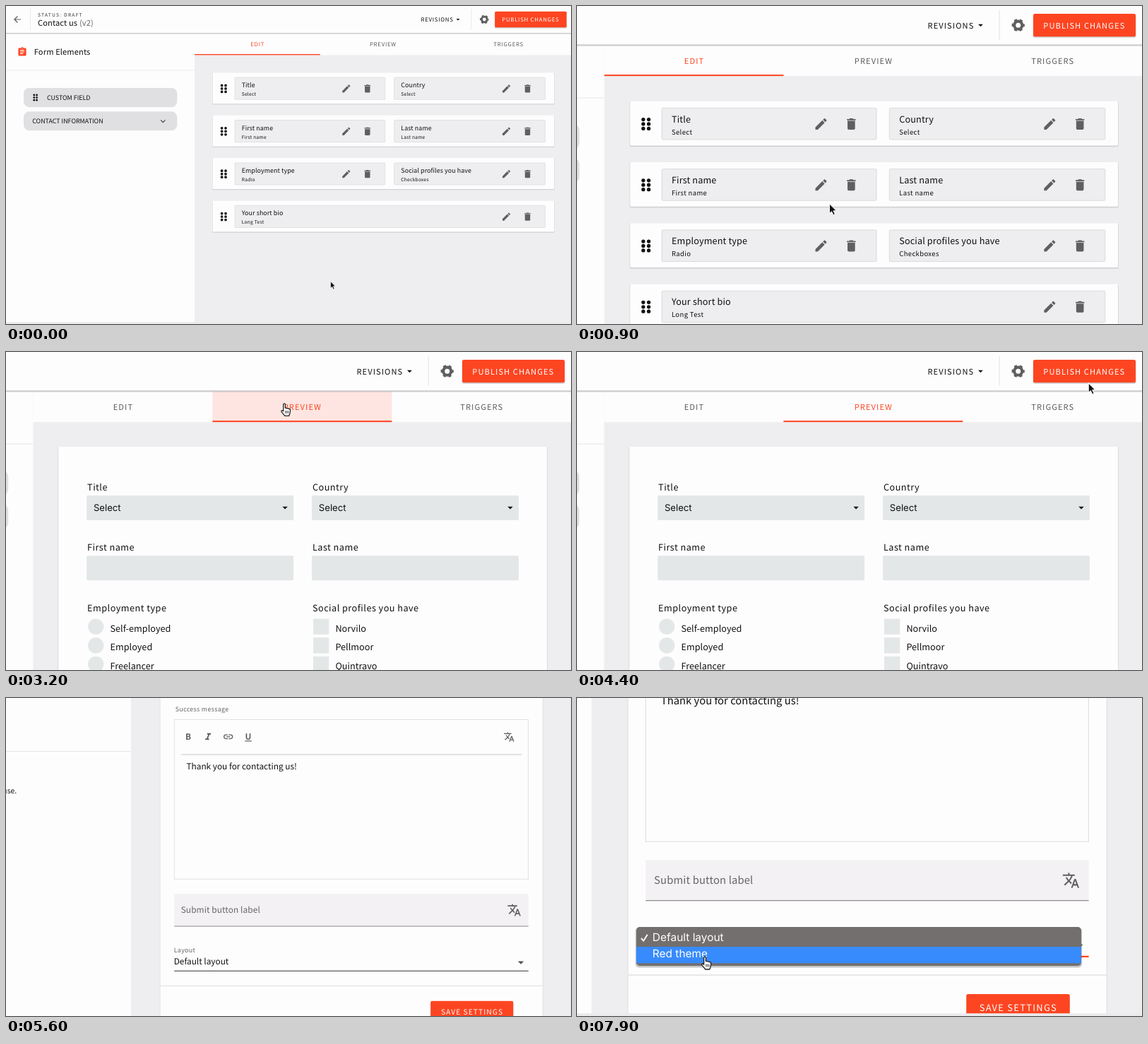
An HTML page for the animation above (8000 ms loop, 800x450 px).

```html
<!DOCTYPE html>
<html lang="en">
<head>
<meta charset="utf-8">
<title>Form builder</title>
<style>
html, body { margin: 0; width: 100%; height: 100%; overflow: hidden; background: #eeedef; }
svg { display: block; width: 100vw; height: 100vh; }
text {
  font-family: "Noto Sans CJK JP", "Noto Sans CJK SC", "Noto Sans CJK", "Noto Sans", sans-serif;
  font-size: 8.88px; fill: #111; text-rendering: geometricPrecision; white-space: pre;
}
.name { letter-spacing: .09px; }
.small { font-size: 6.66px; letter-spacing: .25px; }
.over { font-size: 6.66px; letter-spacing: 1.24px; fill: #333; }
.head { font-size: 11.1px; letter-spacing: .12px; }
.btn { font-size: 7.77px; letter-spacing: .775px; }
.label { letter-spacing: .33px; }
.sys { font-family: Inter, "Liberation Sans", sans-serif; font-size: 9.2px; }
.note { font-size: 8.85px; letter-spacing: .33px; fill: #666; }
.field { font-size: 11.8px; letter-spacing: .1px; }
.menu { font-family: Inter, "Liberation Sans", sans-serif; font-size: 12.3px; fill: #fff; }
</style>
</head>
<body>
<svg id="stage" viewBox="0 0 800 450"></svg>
<script>
const WHITE = '#fefdfe', GREY = '#eeedef', ORANGE = '#fd4521', ICON = '#5f5f5f', SOFT = '#e4e7e8';

const ICONS = {
  back: 'M20 11H7.83l5.59-5.59L12 4l-8 8 8 8 1.41-1.41L7.83 13H20z',
  list: 'M19 3h-4.18C14.4 1.84 13.3 1 12 1s-2.4.84-2.82 2H5a2 2 0 0 0-2 2v14a2 2 0 0 0 2 2h14a2 2 0 0 0 2-2V5a2 2 0 0 0-2-2zm-7 0a1 1 0 1 1 0 2 1 1 0 0 1 0-2zm2 14H7v-2h7zm3-4H7v-2h10zm0-4H7V7h10z',
  pencil: 'M3 17.25V21h3.75L17.81 9.94l-3.75-3.75zM20.71 7.04a1 1 0 0 0 0-1.41l-2.34-2.34a1 1 0 0 0-1.41 0l-1.83 1.83 3.75 3.75z',
  trash: 'M6 19a2 2 0 0 0 2 2h8a2 2 0 0 0 2-2V7H6zM19 4h-3.5l-1-1h-5l-1 1H5v2h14z',
  down: 'M7.4 8.6 12 13.2l4.6-4.6L18 10l-6 6-6-6z',
  caret: 'M7 10l5 5 5-5z',
  italic: 'M10 4v3h2.2l-3.4 8H6v3h8v-3h-2.2l3.4-8H18V4z',
  link: 'M3.9 12A3.1 3.1 0 0 1 7 8.9h4V7H7a5 5 0 0 0 0 10h4v-1.9H7A3.1 3.1 0 0 1 3.9 12zM8 13h8v-2H8zm9-6h-4v1.9h4a3.1 3.1 0 0 1 0 6.2h-4V17h4a5 5 0 0 0 0-10z',
  translate: 'M12.9 15.1l-2.6-2.5C12.1 10.6 13.3 8.4 14.1 6H17V4h-7V2H8v2H1v2h11.2C11.5 7.9 10.4 9.8 9 11.4 8.1 10.3 7.3 9.2 6.7 8h-2c.7 1.6 1.7 3.2 3 4.6l-5.1 5L4 19l5-5 3.1 3.1zM18.5 10h-2L12 22h2l1.1-3h4.8l1.1 3h2zm-2.6 7l1.6-4.3 1.6 4.3z'
};

const rect = (x, y, x2, y2, fill, extra = '') =>
  `<rect x="${x}" y="${y}" width="${x2 - x}" height="${y2 - y}" fill="${fill}" ${extra}/>`;
const text = (x, y, str, cls = '', extra = '') => `<text x="${x}" y="${y}" class="${cls}" ${extra}>${str}</text>`;
const line = (x, y, x2, y2, color, width = 1) =>
  `<path d="M${x} ${y}L${x2} ${y2}" stroke="${color}" stroke-width="${width}"/>`;
const icon = (name, x, y, fill = ICON, k = .62) =>
  `<path d="${ICONS[name]}" transform="translate(${x} ${y}) scale(${k}) translate(-12 -12)" fill="${fill}"/>`;
const dots = (x, y, dx, dy, r) => [-1, 0, 1].map(j => [-1, 1].map(i =>
  `<circle cx="${x + i * dx}" cy="${y + j * dy}" r="${r}" fill="#111"/>`).join('')).join('');
const card = (x, y, x2, y2) =>
  rect(x - .5, y, x2 + .5, y2 + 1.2, '#d3d2d4', 'rx="1"') + rect(x, y - .2, x2, y2, WHITE, 'rx=".8"');
const middle = 'text-anchor="middle"';

function header() {
  return rect(0, 38, 800, 40, '#000', 'opacity=".1"') + rect(0, -2, 800, 38.3, WHITE) + line(0, 38.6, 800, 38.6, '#c4c3c5', .8) +
    icon('back', 16, 19) + line(34.5, 4, 34.5, 34, '#e2e1e3', .7) +
    text(45, 14.6, 'STATUS: DRAFT', 'over') + text(45, 28, 'Contact us', 'head') +
    text(104, 28, '(v2)', 'head', 'style="fill:#666"') +
    text(587.5, 22.1, 'REVISIONS', 'btn') + icon('caret', 640, 19, '#111', .48) +
    line(658.7, 4, 658.7, 33.5, '#e2e1e3', .7) +
    '<circle id="gearHover" cx="677.3" cy="19.3" r="14.3" fill="#d0cfd1"/>' +
    `<g fill="none" stroke="${ICON}"><circle cx="677.3" cy="19" r="3.9" stroke-width="2.9"/>` +
    '<circle cx="677.3" cy="19" r="5.5" stroke-width="1.8" stroke-dasharray="2.9 2.86" stroke-dashoffset="1.45"/></g>' +
    rect(692, 8.6, 794, 31.4, '#000', 'rx="1.5" opacity=".2"') + rect(692.2, 7.7, 793.7, 30.3, ORANGE, 'rx="1.5"') +
    text(702.2, 22.1, 'PUBLISH CHANGES', 'btn', 'style="fill:#fff"');
}

function sidebar() {
  return rect(0, 38, 267, 450, WHITE) + icon('list', 23, 65, ORANGE) +
    text(39.8, 69.4, 'Form Elements', 'head') + line(0, 91, 267, 91, '#e6e5e7', .8) +
    rect(25, 116, 242.3, 143.2, '#e0dfe1', 'rx="8"') + dots(41.7, 129.6, 1.9, 3.6, 1.4) + text(58, 133, 'CUSTOM FIELD') +
    rect(25, 149.3, 242.3, 176.3, '#e0dfe1', 'rx="8"') + text(37.2, 166, 'CONTACT INFORMATION') + icon('down', 222.3, 163, '#444', .6);
}

function tabs() {
  return rect(267, 38, 800, 69.4, WHITE) + rect(444.7, 39, 622.5, 69.4, ORANGE, 'id="tabFill"') +
    ['EDIT', 'PREVIEW', 'TRIGGERS'].map((name, i) =>
      text(356.2 + 177.7 * i, 57.4, name, 'btn', `${middle} id="tab${i}"`)).join('') +
    rect(267, 68, 444.7, 69.4, ORANGE, 'id="underline"');
}

function tile(x, x2, y, name, kind) {
  return rect(x, y, x2, y + 31.2, GREY, 'rx="1" stroke="#d6d5d7" stroke-width=".6"') +
    text(x + 9.7, y + 14.1, name, 'name') + text(x + 9.7, y + 26, kind, 'small') +
    icon('pencil', x2 - 55, y + 15.8) + icon('trash', x2 - 25, y + 15.8);
}

function editor() {
  const rows = [
    ['Title', 'Select', 'Country', 'Select'],
    ['First name', 'First name', 'Last name', 'Last name'],
    ['Employment type', 'Radio', 'Social profiles you have', 'Checkboxes'],
    ['Your short bio', 'Long Test']
  ];
  return rows.map(([a, b, c, d], i) => {
    const y = 94.5 + 60.4 * i;
    return card(292.6, y, 776.2, y + 43.8) + dots(308.3, y + 22.4, 2.7, 4.5, 1.85) +
      tile(324, c ? 536.8 : 763.5, y + 6.6, a, b) + (c ? tile(549.6, 763.5, y + 6.6, c, d) : '');
  }).join('');
}

function preview() {
  const cols = [
    [320, 'Title', 'First name', 'Employment type', ['Self-employed', 'Employed', 'Freelancer']],
    [543.2, 'Country', 'Last name', 'Social profiles you have', ['Norvilo', 'Pellmoor', 'Quintravo']]
  ];
  return card(292, 94, 776.2, 452) + cols.map(([x, a, b, c, options], n) =>
    [a, b, c].map((label, i) => text(x + .6, 137.1 + 59.9 * i, label, 'label')).join('') +
    [142, 201.7].map(y => rect(x, y, x + 205, y + 24.5, SOFT, 'rx=".8"')).join('') +
    text(x + 6.8, 157.6, 'Select', 'sys') + icon('caret', x + 196.6, 154.2, '#111', .52) +
    options.map((label, i) => {
      const y = 272 + 18.65 * i;
      return rect(x + 1.3, y - 7.8, x + 16.9, y + 7.8, SOFT, n ? 'rx=".6"' : 'rx="7.8"') + text(x + 23.3, y + 5, label);
    }).join('')).join('') +
    text(320.6, 349, 'Your short bio', 'label') + rect(320, 354, 748.2, 425, SOFT, 'rx=".8"');
}

// Laid out at its resting zoom of 1.165, then scaled back to page size.
function settings() {
  return '<g transform="translate(800 450) scale(.8584) translate(-800 -450)">' +
    rect(-200, -40, 800, 450, GREY) + rect(-200, -40, 179.5, 450, WHITE) + line(-200, 73.5, 179.5, 73.5, '#e6e5e7') +
    text(18.5, 133, 'use.', 'field', 'text-anchor="end" style="font-size:10.2px"') +
    card(220.8, -40, 760, 460) + text(242, 17.6, 'Success message', 'note') +
    rect(240.7, 28.7, 739.8, 253.5, 'none', 'stroke="#dfdee0" stroke-width=".9"') +
    text(260.3, 57.4, 'B', 'field', `${middle} font-weight="700" style="fill:${ICON}"`) +
    icon('italic', 288.3, 53.3, ICON, .66) + icon('link', 316.7, 53, ICON, .66) +
    text(345, 57, 'U', 'field', `${middle} font-weight="700" style="fill:${ICON}"`) + line(340.3, 59, 349.7, 59, ICON, 1.2) +
    icon('translate', 712.7, 53.2, ICON, .66) + line(250, 78, 731, 78, '#c9c8ca') +
    text(257.7, 99, 'Thank you for contacting us!', 'field', 'style="letter-spacing:0"') +
    rect(240.5, 274.5, 740, 320, '#f3f1f3', 'rx="1"') + line(240.5, 320, 740, 320, '#8a898b') +
    text(250, 301.4, 'Submit button label', 'field', 'style="fill:#666"') + icon('translate', 720, 297.2, ICON, .84) +
    text(240, 356.6, 'Layout', 'note') + text(240, 374, 'Default layout', 'field', 'style="letter-spacing:0"') +
    icon('caret', 729.3, 371, '#555', .85) +
    '<path id="selectLine" d="M240.5 383H740"/>' + line(221, 404, 760, 404, '#dddcde') +
    rect(602, 427, 718.6, 456, '#000', 'rx="2" opacity=".2"') + rect(602, 425.3, 718.6, 454, ORANGE, 'rx="2"') +
    text(660.6, 444.4, 'SAVE SETTINGS', 'btn', `${middle} style="font-size:10.27px;letter-spacing:1.02px;fill:#fff"`) +
    '<g id="menu">' + rect(229, 350, 732.3, 395.5, '#000', 'rx="4" opacity=".22"') +
    rect(230, 349.7, 731.5, 393.5, '#736f6e', 'rx="4"') + rect(230, 372, 731.5, 390.5, '#388bfd') +
    '<path d="M235.5 362.3l2.6 3 4.4-7" fill="none" stroke="#fff" stroke-width="1.5"/>' +
    text(248.2, 365.8, 'Default layout', 'menu') + text(248.2, 384.2, 'Red theme', 'menu') + '</g></g>';
}

const CURSORS = '<g id="cursor"><path id="arrow" d="M0 0V9.6L2.2 7.6 3.8 11.1 5.5 10.3 3.9 6.9H6.9z" fill="#111" stroke="#fff" stroke-width=".7"/>' +
  '<g id="hand" transform="translate(-3.6 0)" fill="#fff" stroke="#222" stroke-width=".9" stroke-linejoin="round">' +
  '<path d="M2.7 1.2C2.7-.3 4.6-.3 4.6 1.2V4.4L8 5C9.4 5.3 9.8 6 9.6 7.1L9.2 9.6 8.3 12.3H4.2L1 8.4C.2 7.2 1.3 6.4 2.1 7.1L2.7 7.7z"/>' +
  '<path d="M4.8 7.2V9.8M6.2 7.2V9.8M7.6 7.2V9.8" stroke-width=".6"/></g></g>';

document.getElementById('stage').innerHTML = '<g id="camera">' + rect(0, 0, 800, 450, GREY) +
  `<g id="builder">${sidebar()}${tabs()}<g id="editor">${editor()}</g><g id="preview">${preview()}</g></g>` +
  `<g id="settings">${settings()}</g>${header()}${rect(-10, 447.4, 810, 452, '#ebeaec')}${CURSORS}</g>`;

const $ = id => document.getElementById(id);
const show = (id, on) => $(id).setAttribute('visibility', on ? 'visible' : 'hidden');
const cubic = t => t < .5 ? 4 * t ** 3 : 1 - 4 * (1 - t) ** 3;
const smooth = t => t * t * (3 - 2 * t);
const linear = t => t;

// Keys are [time, ...values]; holds the last value after the end.
function at(keys, t, ease) {
  const i = keys.findIndex(k => k[0] > t);
  if (i < 0) return keys[keys.length - 1].slice(1);
  const [a, b] = [keys[i - 1], keys[i]];
  const p = ease((t - a[0]) / (b[0] - a[0]));
  return a.slice(1).map((v, j) => v + (b[j + 1] - v) * p);
}

// time, zoom, vertical shift; the right edge stays put
const CAMERA = [[0, 1, 0], [960, 1.4287, 0], [4600, 1.4287, 0], [5800, 1.165, -74.25], [6850, 1.165, -74.25], [7800, 1.4634, -208.5]];
const POINTER = [[0, 459.5, 390], [500, 473, 293], [1500, 515.8, 51], [3650, 515.8, 51], [4200, 782, 36], [4500, 735, 29],
  [4800, 670, 22.5], [5400, 670, 22.5], [6600, 382.8, 375.3], [7300, 382.8, 375.3], [7800, 377, 392.6]];
const TAB_FILL = [[0, 0], [1300, 0], [1450, .13], [1650, .13], [1800, .27], [1950, .27], [2200, .13], [3700, .13], [3900, 0]];

function draw(now) {
  const t = now % 8000;
  const [zoom, shift] = at(CAMERA, t, cubic);
  const [x, y] = at(POINTER, t, t < 1500 ? linear : smooth);
  const isPreview = t >= 1950, isSettings = t >= 5300, isOpen = t >= 7300;
  const isHand = (t > 1400 && t < 3850) || (t > 4600 && t < 5400) || t > 6500;

  $('camera').setAttribute('transform', `translate(${800 * (1 - zoom)} ${shift}) scale(${zoom})`);
  $('cursor').setAttribute('transform', `translate(${x} ${y})`);
  show('arrow', !isHand);
  show('hand', isHand);
  show('builder', !isSettings);
  show('editor', !isPreview);
  show('preview', isPreview && !isSettings);
  show('settings', isSettings);
  show('menu', isOpen);
  show('gearHover', t >= 4600 && t < 5400);

  $('tabFill').setAttribute('opacity', at(TAB_FILL, t, linear)[0]);
  $('underline').setAttribute('x', isPreview ? 444.7 : 267);
  [0, 1, 2].forEach(i => $('tab' + i).style.fill = i === +isPreview ? ORANGE : '#5c5b5d');
  $('selectLine').setAttribute('stroke', isOpen ? ORANGE : '#333');
  $('selectLine').setAttribute('stroke-width', isOpen ? 1.7 : 1);
  requestAnimationFrame(draw);
}
const start = performance.now();
const frame = draw;
draw = () => frame(performance.now() - start);
draw();
</script>
</body>
</html>
```
